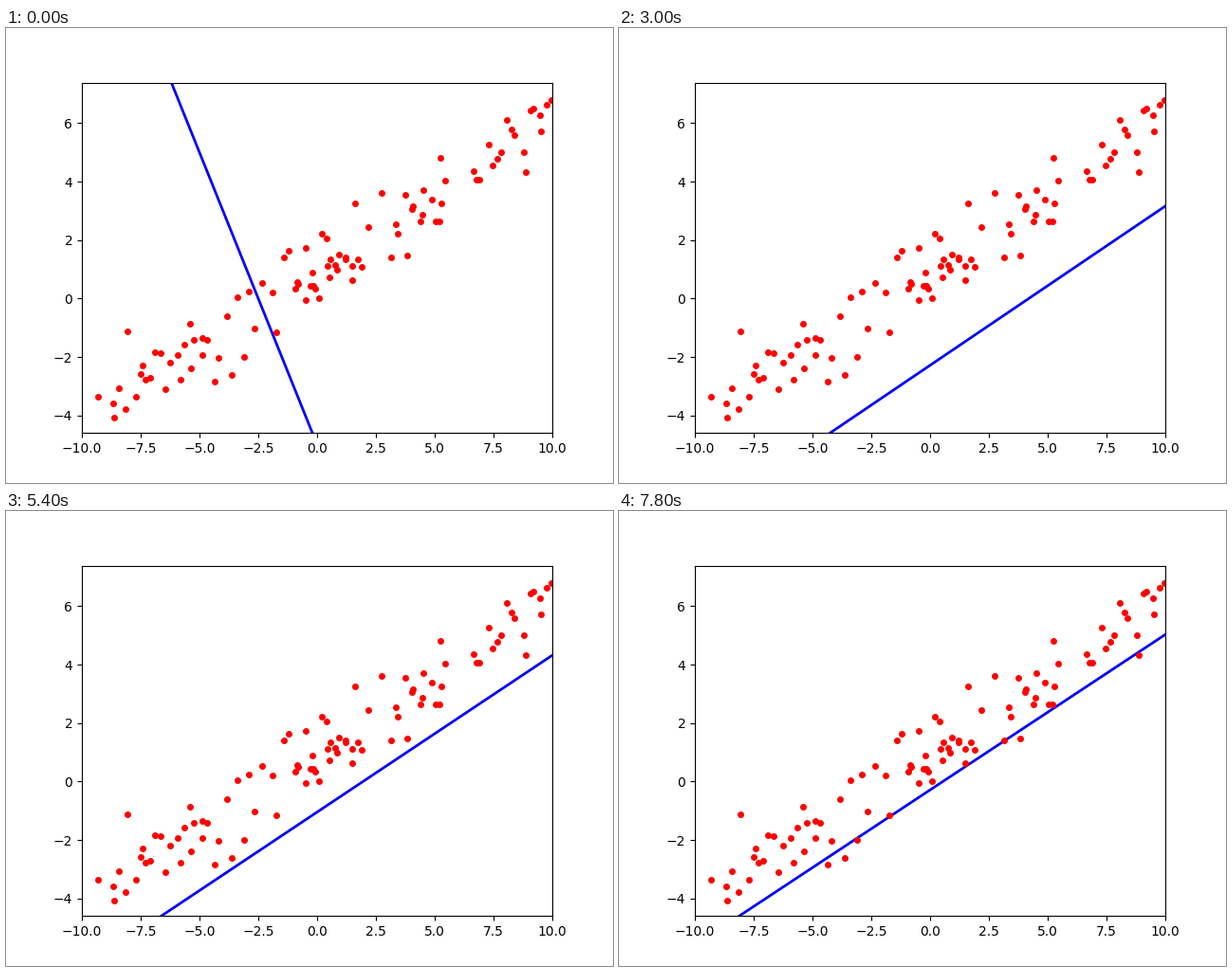
Write a matplotlib script that moves like this. It is 640 px wide and 480 px high and loops after 8000 ms.

```python
import matplotlib.pyplot as plt
import numpy as np
from matplotlib.animation import FuncAnimation

FRAMES = 40
RATE = 0.02
COUNT = 100
SLOPE, BIAS = 0.524, 0.916   # best fit of the samples
MEAN_X = 0.19
NOISE = 0.85

# Spread of the samples: rank and x, dense around zero
RANKS = [0, 17, 28, 38, 63, 66, 81, 82, 90, 99]
KNOTS = [-9.35, -6.1, -4.0, -1.1, 1.8, 3.2, 5.5, 6.5, 8.3, 9.95]


def make_samples(rng):
    """Noisy points whose least-squares line is exactly SLOPE, BIAS."""
    x = np.interp(np.arange(COUNT), RANKS, KNOTS)
    x[1:-1] += rng.uniform(-0.15, 0.15, COUNT - 2)
    x += MEAN_X - x.mean()
    noise = rng.normal(0, NOISE, COUNT)
    noise -= np.polyval(np.polyfit(x, noise, 1), x)
    return x, SLOPE * x + BIAS + noise


def descend(x, y, slope, bias, steps):
    """Gradient descent on the mean squared error; one (slope, bias) per step."""
    path = []
    for _ in range(steps):
        path.append((slope, bias))
        err = slope * x + bias - y
        slope -= RATE * 2 * np.mean(err * x)
        bias -= RATE * 2 * np.mean(err)
    return path


x, y = make_samples(np.random.default_rng(7))
path = descend(x, y, -2.0, -5.0, FRAMES)
ends = np.array([-10.0, 10.0])

fig, ax = plt.subplots(figsize=(6.4, 4.8), dpi=100)
ax.set_xlim(-10, 10)
ax.set_ylim(-4.6, 7.39)
line, = ax.plot([], [], "b", linewidth=2)
ax.plot(x, y, "ro", markersize=4)


def update(i):
    slope, bias = path[i]
    line.set_data(ends, slope * ends + bias)
    return line,


anim = FuncAnimation(fig, update, frames=FRAMES, interval=200,
                     repeat=True, repeat_delay=0)
plt.show()
```
